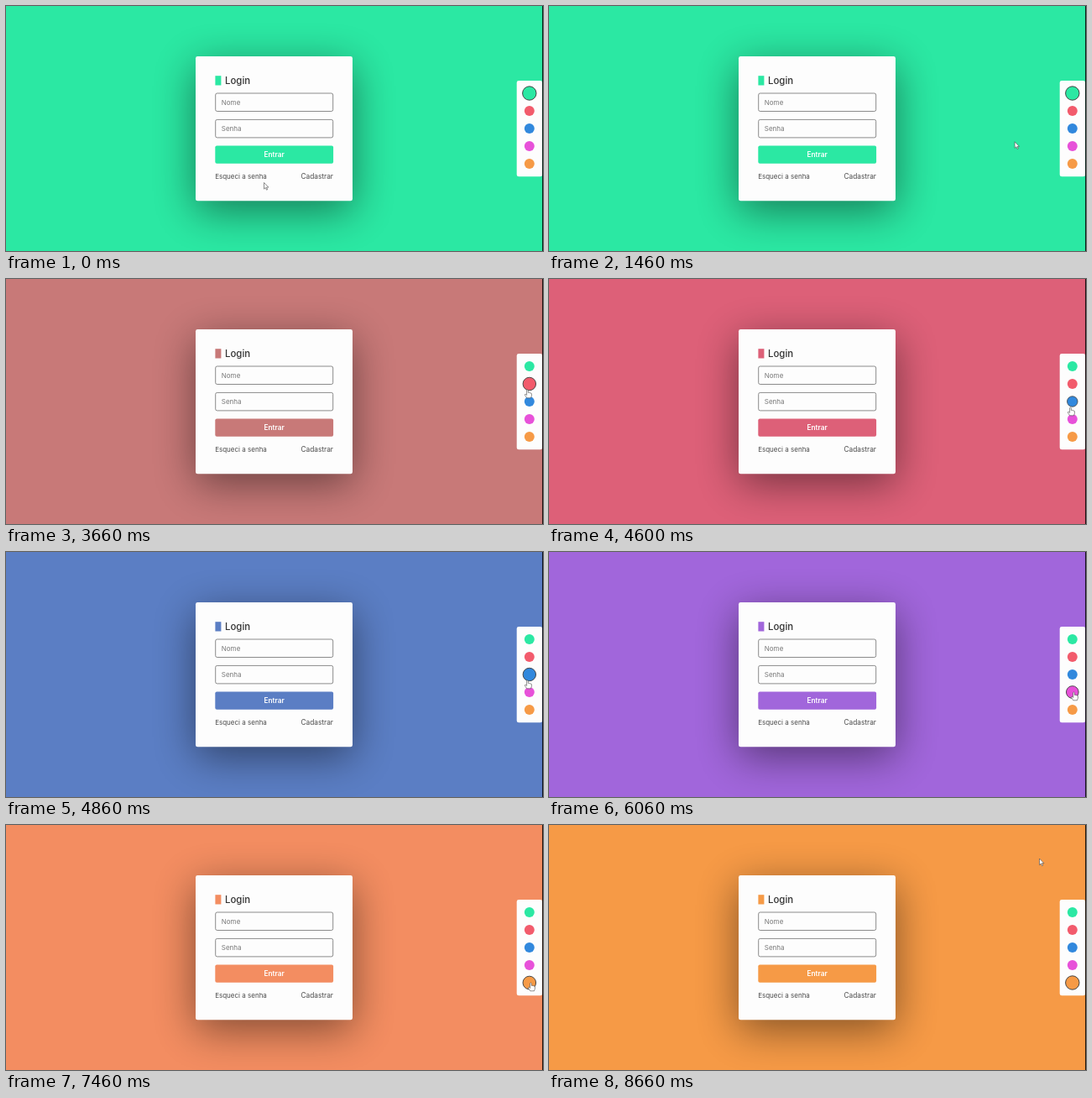
Animation, 640 px wide and 292 px high, one loop 8.73 s. Source, as an HTML page:

```html
<!DOCTYPE html>
<html lang="pt">
<head>
<meta charset="utf-8">
<title>Login</title>
<style>
  html, body { margin: 0; width: 100%; height: 100%; overflow: hidden; }
  svg { display: block; width: 100vw; height: 100vh; }
  text { font: 8px Inter, "Open Sans", sans-serif; fill: #4a4a4a; }
  .title { font-size: 11.4px; font-weight: 500; fill: #333; }
  .hint { fill: #777; }
  .button { font-size: 8.3px; font-weight: 600; fill: #fff; text-anchor: middle; }
  .end { font-size: 8.3px; text-anchor: end; }
  .accent { fill: var(--accent); }
  .panel { fill: #fdfdfd; }
  .field { fill: #fdfdfd; stroke: #666; stroke-width: .75; }
  .shadow { filter: blur(25px); opacity: .47; }
  .edge { opacity: .85; }
  .pointer { fill: #fff; stroke: #444; stroke-width: .6; stroke-linejoin: round; }
</style>
</head>
<body>
<svg viewBox="0 0 640 292" preserveAspectRatio="none">
  <rect class="accent" width="640" height="292"/>
  <rect class="shadow" x="226" y="72" width="187" height="172"/>
  <rect class="panel" x="226" y="60" width="187" height="172.3" rx="2.4"/>
  <rect class="accent" x="249.4" y="83.2" width="7" height="11.3"/>
  <text class="title" x="261" y="92.8">Login</text>
  <rect class="field" x="249.7" y="104" width="140" height="21.5" rx="2"/>
  <text class="hint" x="256.8" y="117.6">Nome</text>
  <rect class="field" x="249.7" y="135.4" width="140" height="21.5" rx="2"/>
  <text class="hint" x="256.8" y="149">Senha</text>
  <rect class="accent" x="249.3" y="166.4" width="140.8" height="21.4" rx="2"/>
  <text class="button" x="319.6" y="180">Entrar</text>
  <text x="249.2" y="205.8">Esqueci a senha</text>
  <text class="end" x="390" y="205.8">Cadastrar</text>
  <rect class="panel" x="608.7" y="89" width="30.5" height="114.3" rx="2.4"/>
  <g id="dots" stroke="#444"></g>
  <rect class="edge" x="639" width="1" height="292"/>
  <g id="cursor" class="pointer">
    <path id="arrow" d="M0 0V7.6L1.8 6L3 8.7L4.2 8.2L3 5.6H5.4Z"/>
    <path id="hand" d="M-.9 .6Q0 -.6 .8 .6V3.4Q1.8 2.8 2.3 3.7Q3.2 3.2 3.7 4.1Q4.8 3.8 4.9 5V7.2L3.9 9.8H-.7L-3 6.5Q-3.4 5.2 -2.2 5.3L-.9 6.4Z"/>
  </g>
</svg>
<script>
const LOOP = 8730, FADE = 700, MS_PER_PX = 4.5, DOT_X = 623.8;
const colors = ["#2be8a3", "#f25b6c", "#3188dd", "#e751d9", "#f69a46"];
const clicks = [-FADE, 3320, 4525, 5812, 7100];

const byId = id => document.getElementById(id);
const clamp = v => Math.max(0, Math.min(1, v));
const mix = (a, b, k) => a + (b - a) * k;
const smooth = k => k * k * (3 - 2 * k);
const dotY = i => 104 + 21 * i;

// The pointer rests low on the upper dots and centred on the lower ones.
const rest = i => i < 3 ? [621.5, dotY(i) + 7] : [625.5, dotY(i)];
const stops = [
  [0, 307.5, 210.5],
  [1860, 615, 150],
  [2900, 621.5, 122.5],
  ...clicks.map((c, i) => [c - 20, ...rest(i)]).slice(1),
  [8600, 584.5, 40]
];

// cubic-bezier(.25, .1, .25, 1)
function ease(x) {
  let lo = 0, hi = 1;
  for (let i = 0; i < 20; i++) {
    const s = (lo + hi) / 2, r = 1 - s;
    if (.75 * s * r + s ** 3 < x) lo = s; else hi = s;
  }
  const r = 1 - lo;
  return .3 * lo * r * r + 3 * lo * lo * r + lo ** 3;
}

// Each move ends on its stop's time and takes as long as its distance asks.
function pointerAt(t) {
  let [, x, y] = stops[0];
  for (const [end, x1, y1] of stops.slice(1)) {
    const span = MS_PER_PX * Math.hypot(x1 - x, y1 - y);
    const k = smooth(clamp(1 - (end - t) / span));
    if (k < 1) return [mix(x, x1, k), mix(y, y1, k)];
    [x, y] = [x1, y1];
  }
  return [x, y];
}

const dots = colors.map((color, i) => {
  const dot = document.createElementNS("http://www.w3.org/2000/svg", "circle");
  dot.setAttribute("cx", DOT_X);
  dot.setAttribute("cy", dotY(i));
  dot.setAttribute("fill", color);
  byId("dots").append(dot);
  return dot;
});

function draw(t) {
  const active = clicks.findLastIndex(c => t >= c);
  const k = ease(clamp((t - clicks[active]) / FADE));
  const from = colors[Math.max(0, active - 1)];
  document.body.style.setProperty("--accent",
    `color-mix(in srgb, ${colors[active]} ${k * 100}%, ${from})`);
  dots.forEach((dot, i) => {
    const on = i === active;
    dot.setAttribute("r", on ? 6 + 2.2 * k : 6);
    dot.setAttribute("stroke-width", on ? .8 + .2 * k : 0);
  });

  const [x, y] = pointerAt(t);
  const over = dots.some((dot, i) => Math.hypot(x - DOT_X, y - dotY(i)) < 9);
  byId("cursor").setAttribute("transform", `translate(${x} ${y})`);
  byId("hand").style.display = over ? "" : "none";
  byId("arrow").style.display = over ? "none" : "";
}

const start = performance.now();
function tick() {
  draw((performance.now() - start) % LOOP);
  requestAnimationFrame(tick);
}
tick();
</script>
</body>
</html>
```
